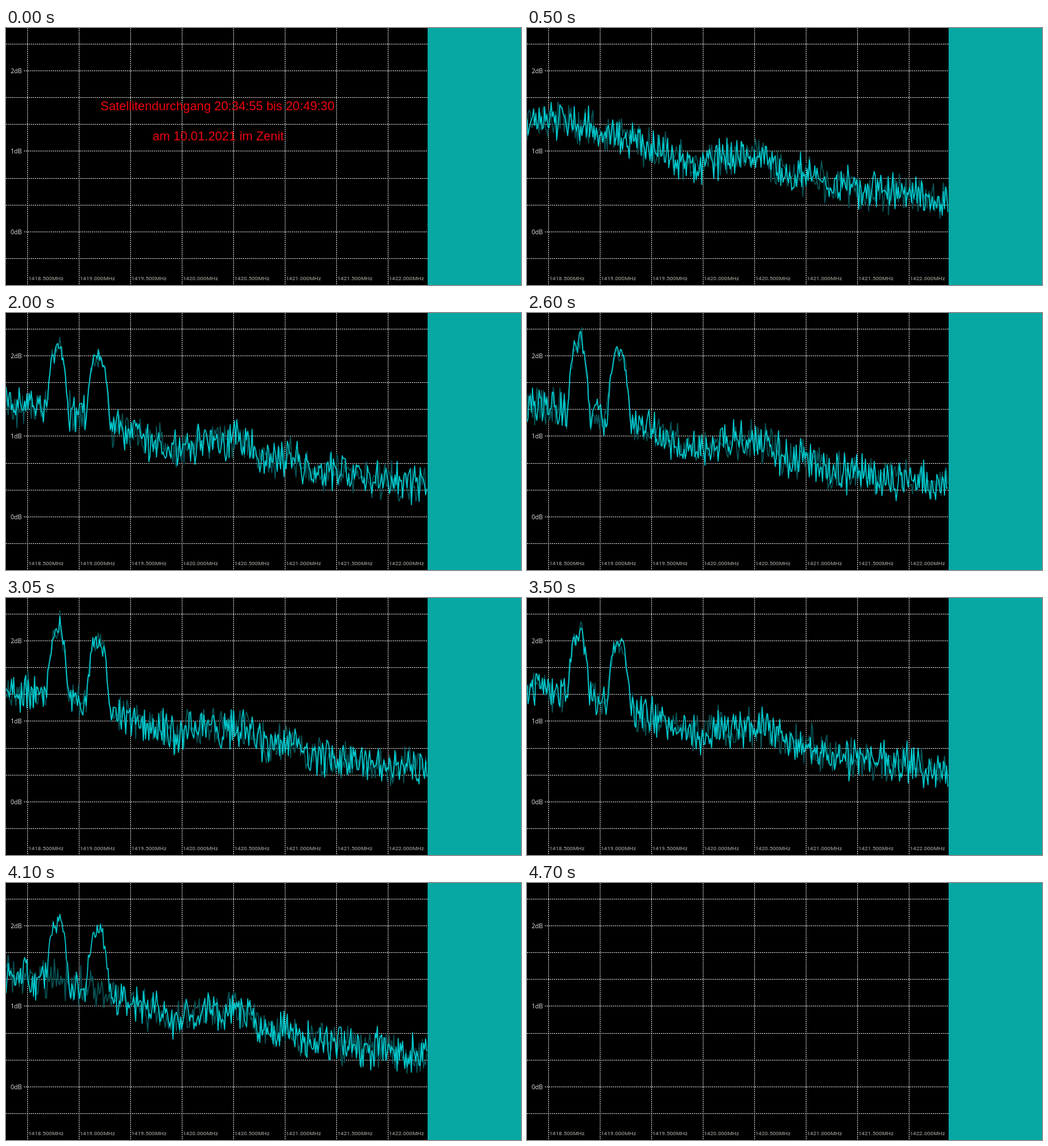
Animation of 750 by 375 pixels, one loop 6200 ms. Source, as an HTML page:

```html
<!DOCTYPE html>
<html lang="de">
<head>
<meta charset="utf-8">
<title>Spektrum</title>
<style>
  html, body { margin: 0; width: 100%; height: 100%; overflow: hidden; background: #000; }
  svg { display: block; width: 750px; height: 375px; }
  .grid { stroke: #bcbcbc; stroke-width: 1; stroke-dasharray: 2 1; shape-rendering: crispEdges; }
  .db { font: 9px "Noto Sans", sans-serif; fill: #d4d4d4; }
  .mhz { font: 500 8.1px Roboto, sans-serif; fill: #8c8c86; }
  .title { font: 18.2px "Liberation Sans", Arial, sans-serif; fill: #f00010; }
  .trace { fill: none; stroke-linejoin: round; stroke-width: 1.5; }
</style>
</head>
<body>
<svg viewBox="0 0 750 375">
  <rect width="750" height="375" fill="#000"/>
  <g id="grid"></g>
  <g id="title" class="title">
    <text x="137.5" y="120">Satellitendurchgang 20:34:55 bis 20:49:30</text>
    <text x="213.5" y="163.5">am 10.01.2021 im Zenit</text>
  </g>
  <path id="old" class="trace" stroke="#075457"/>
  <path id="now" class="trace" stroke="#00dade" stroke-opacity=".92"/>
  <rect x="614" width="136" height="375" fill="#07a8a4"/>
</svg>
<script>
const LOOP = 6200, SHOW = 500, RUN = 1100, STEP = 150, CLEAR = 4700;
const LAST = (CLEAR - RUN) / STEP;
const WIDTH = 614, DX = 1.6, NOISE = 35;
const $ = id => document.getElementById(id);

function add(tag, attrs, text = "") {
  const el = document.createElementNS("http://www.w3.org/2000/svg", tag);
  for (const k in attrs) el.setAttribute(k, attrs[k]);
  el.textContent = text;
  $("grid").append(el);
}

function drawGrid() {
  for (let i = 0; i < 9; i++) {
    const y = Math.floor(23.5 + i * 39.1) + 0.5;
    const labelled = i % 3 === 1;
    add("line", { class: "grid", x1: labelled ? 26 : 0, x2: WIDTH, y1: y, y2: y });
    if (labelled) add("text", { class: "db", x: 6.7, y: y + 3.3 }, 2 - (i - 1) / 3 + "dB");
  }
  for (let i = 0; i < 8; i++) {
    const x = Math.floor(31 + i * 75.1) + 0.5;
    add("line", { class: "grid", x1: x, x2: x, y1: 0, y2: 375 });
    add("text", { class: "mhz", x: x + 1, y: 368 }, (1418.5 + i / 2).toFixed(3) + "MHz");
  }
}

function random(seed) {
  let s = seed * 7919 + 12345;
  return () => {
    s = (s + 0x6d2b79f5) | 0;
    let t = Math.imul(s ^ (s >>> 15), 1 | s);
    t = (t + Math.imul(t ^ (t >>> 7), 61 | t)) ^ t;
    return ((t ^ (t >>> 14)) >>> 0) / 4294967296;
  };
}

// Average noise floor
const floor = [
  [0, 134], [105, 147], [150, 162], [245, 199], [290, 188],
  [350, 188], [380, 218], [410, 210], [435, 229], [614, 251]
];

function level(x) {
  const i = Math.max(1, floor.findIndex(p => p[0] >= x));
  const [x0, y0] = floor[i - 1], [x1, y1] = floor[i];
  return y0 + (y1 - y0) * (x - x0) / (x1 - x0);
}

// The two carriers; the first ends in a sharp tip
const carriers = [
  { mid: 75, half: 16, height: 80, tip: 22 },
  { mid: 134, half: 17, height: 82, tip: 6 }
];
const quiet = step => step < 3 || step === 20 || step > 21;

function makeTrace(step) {
  const rnd = random(step + 2);
  // Strongest in the middle of the pass
  const pass = Math.sin(Math.PI * (step - 3) / 18);
  const gains = carriers.map(() => 1 + 0.14 * pass + 0.1 * (rnd() - 0.5));
  let d = "";
  for (let x = 0; x <= WIDTH; x += DX) {
    let lift = 0, noise = (rnd() + rnd() - 1) * NOISE;
    carriers.forEach((c, i) => {
      const u = Math.abs(x - c.mid) / c.half;
      if (u >= 1 || quiet(step)) return;
      const tip = c.tip * Math.max(0, 1 - Math.abs(x - c.mid - 4) / 3);
      lift = (c.height * (1 - u ** 3) + tip) * gains[i];
      noise *= 0.5;
    });
    const y = Math.max(0, level(x) - lift + noise);
    d += (d ? "L" : "M") + x.toFixed(1) + " " + y.toFixed(1);
  }
  return d;
}

const traces = Array.from({ length: LAST + 2 }, (_, i) => makeTrace(i - 1));

let shown = null;
function render(t) {
  const step = t < SHOW ? -1 : t < RUN ? 0 : 1 + Math.floor((t - RUN) / STEP);
  if (step === shown) return;
  shown = step;
  const live = step >= 0 && step <= LAST;
  $("title").style.display = step < 0 ? "" : "none";
  $("old").setAttribute("d", live ? traces[step] : "");
  $("now").setAttribute("d", live ? traces[step + 1] : "");
}

drawGrid();
const start = performance.now();
function tick() {
  render((performance.now() - start) % LOOP);
  requestAnimationFrame(tick);
}
tick();
</script>
</body>
</html>
```
